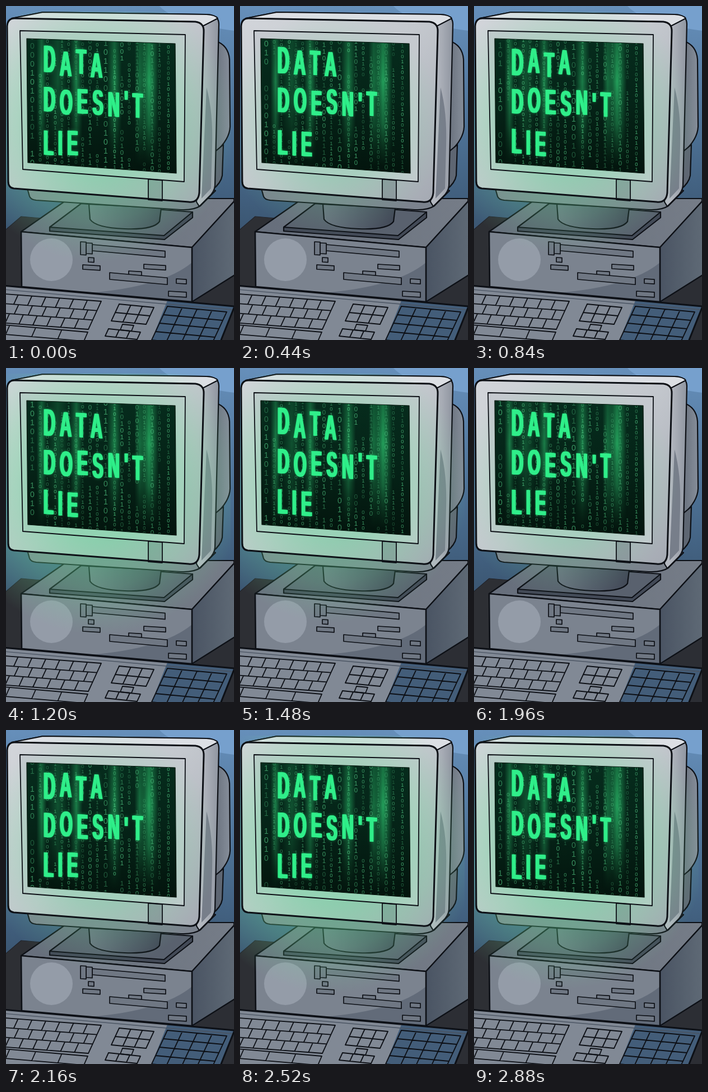
Write an HTML page with a canvas that moves like this. It is 407 px wide and 595 px high and loops after 2920 ms.

```html
<!DOCTYPE html>
<html lang="en">
<head>
<meta charset="utf-8">
<title>Data doesn't lie</title>
<style>
html, body { margin: 0; width: 100%; height: 100%; overflow: hidden; background: #496889; }
canvas { display: block; }
</style>
</head>
<body>
<canvas id="stage" width="407" height="595"></canvas>
<script>
const LOOP = 2920, STEP = 40, TAU = Math.PI * 2;
const INK = '#0d1016';
const c = document.getElementById('stage').getContext('2d');

let seed = 11;
const rnd = () => (seed = (seed * 16807) % 2147483647) / 2147483647;

function shape(d, fill, line = 2.2, ink = INK) {
  const p = new Path2D(d);
  if (fill) { c.fillStyle = fill; c.fill(p); }
  if (line) { c.strokeStyle = ink; c.lineWidth = line; c.stroke(p); }
}

function ramp(x0, y0, x1, y1, ...colors) {
  const g = c.createLinearGradient(x0, y0, x1, y1);
  colors.forEach((k, i) => g.addColorStop(i / (colors.length - 1), k));
  return g;
}

// A slanted box split into keys: origin, vector along the row, vector down.
function keys(x, y, ux, uy, vx, vy, cols, rows, shift = 0) {
  let d = '';
  for (let r = 0; r <= rows; r++) {
    const a = r / rows;
    d += `M${x + vx * a} ${y + vy * a}l${ux} ${uy}`;
    if (r === rows) break;
    for (let i = 0; i <= cols; i++) {
      const edge = i === 0 || i === cols;
      const b = (i + (edge ? 0 : shift * (r % 2))) / cols;
      d += `M${x + vx * a + ux * b} ${y + vy * a + uy * b}l${vx / rows} ${vy / rows}`;
    }
  }
  shape(d, null, 1.8);
}

const slot = (x, y, w, h, k = 0.06) =>
  shape(`M${x} ${y}l${w} ${w * k}v${h}l${-w} ${-w * k}z`, '#6f7783', 1.7);

function room() {
  c.fillStyle = ramp(0, 0, 0, 400, '#668fba', '#4f7499', '#3b5672');
  c.fillRect(0, 0, 407, 595);
  shape('M274 0Q300 30 407 44V0z', '#76a0cd', 0);
  shape('M0 398L27 375L95 381L40 595H0z', '#2d2f34', 0);
  shape('M0 398L27 375L62 378', null, 1.2, '#22242b');
  shape('M330 530L407 478V595H330z', '#2c2e34', 0);
}

function tower() {
  shape('M27 402L112 343L407 343V348L332 430z', ramp(60, 380, 400, 360, '#676f7c', '#757c87'));
  shape('M332 430L410 345V478L332 527z', ramp(332, 0, 407, 0, '#4a5463', '#5e6975'));
  shape('M27 402L332 430V527L28 500z', '#7b838f', 0);
  shape('M150 511Q280 500 332 457V527z', '#626b79', 0);
  shape('M27 402L332 430V527L28 500z', null, 2.6);

  c.fillStyle = '#949ca8';
  c.beginPath();
  c.arc(81, 452, 38, 0, TAU);
  c.fill();

  slot(154, 425, 130, 11, 0.09);
  slot(143, 422, 11, 19);
  slot(133, 420, 10, 23);
  slot(147, 448, 10, 8);
  slot(137, 461, 31, 8);
  slot(246, 460, 39, 8);
  slot(219, 472, 23, 7);
  slot(185, 475, 103, 12, 0.09);
  slot(304, 486, 18, 8);
  slot(290, 508, 32, 9);

  shape('M78 394V401L283 416L333 377V367z', '#434a57');
  shape('M78 394L134 352L333 367L282 409z', '#59616e');
  shape('M148 353L150 380Q160 395 212 397Q263 399 274 384L277 360z',
    ramp(148, 0, 277, 0, '#69717e', '#535b69', '#424a57'));
}

function keyboard() {
  const body = 'M-5 498L275 523L408 535L382 600H-5z';
  c.save();
  c.clip(new Path2D(body));
  shape(body, '#818995', 0);
  shape('M290 520L420 530V600H258L274 560z', '#435d79', 0);
  shape('M-5 505L275 530L404 541', null, 1.3, '#4a5462');
  keys(-28, 511, 198, 15, -23, 50, 8, 3, 0.35);
  keys(-40, 565, 186, 16, -7, 16, 4, 1);
  keys(202, 531, 62, 6, -14, 30, 3, 2);
  keys(208, 567, 20, 2, -4, 10, 1, 1);
  keys(183, 575, 57, 6, -6, 13, 3, 1);
  keys(288, 535, 106, 10, -28, 60, 4, 4);
  c.restore();
  shape(body, null, 3);
}

function glow(power) {
  const g = c.createRadialGradient(165, 210, 100, 165, 210, 200 + 65 * power);
  g.addColorStop(0, `rgba(85,225,145,${0.25 + 0.2 * power})`);
  g.addColorStop(0.5, `rgba(110,225,155,${0.12 + 0.16 * power})`);
  g.addColorStop(1, 'rgba(120,220,160,0)');
  c.fillStyle = g;
  c.fillRect(0, 10, 401, 474);
}

function monitor(power) {
  const front = 'M2 36Q3 22 15 22L338 28Q354 30 353 46L345 333Q343 351 326 349L14 325Q4 324 4 312z';
  const bezel = 'M25 44L320 51L318 313L30 291z';
  const button = 'M254 308.5V345L279 347V310.5z';

  shape('M374 62Q397 70 399 95L400 215Q399 238 374 260z', ramp(370, 0, 401, 0, '#666e7a', '#878f9b'));
  shape('M370 262L388 247L386 302Q384 315 368 328z', '#5e6672');
  shape('M38 325L42 339Q44 345 54 346L312 363Q335 364 347 356L374 329L350 320z', '#7b828d');
  shape('M10 22L66 11L358 15Q380 16 380 32L373 320Q372 331 362 340L345 357L340 349L352 50z',
    ramp(350, 0, 380, 0, '#b4b8c0', '#8f95a0'));
  shape('M10 22L66 11L358 15Q374 16 378 22L349 37Q346 29 338 28z', '#dcdfe4', 2);
  shape('M358 145Q370 190 368 250L366 325L349 343z', '#777e8a', 0);
  shape(front, ramp(0, 22, 340, 350, '#d2d5da', '#c4c8ce', '#a5aab3'), 0);
  shape(bezel, '#c5c9cf', 0);
  shape(button, '#8f949e', 0);
  glow(power);
  shape(front, null, 3);
  shape(bezel, null, 1.8);
  shape(button, null, 1.8);
}

const columns = [47, 61, 74, 88, 100, 112, 125, 137, 150, 163, 178, 194, 207, 220, 234, 247, 261, 274, 290]
  .map(x => {
    const big = x === 47 || x === 178;
    const pitch = big ? 16 : x % 3 ? 9.4 : 12;
    let on = true;
    const digits = Array.from({ length: Math.ceil(300 / pitch) }, () => {
      if (rnd() < (on ? 0.05 : 0.4)) on = !on;
      return on ? (rnd() < 0.5 ? '0' : '1') : '';
    });
    return { x, pitch, digits, size: big ? 14 : x % 3 ? 9.5 : 11.5,
      laps: 1 + Math.floor(rnd() * 2), start: rnd(), alpha: 0.55 + rnd() * 0.35 };
  });

function rain(u) {
  c.textAlign = 'center';
  for (const k of columns) {
    const len = k.pitch * k.digits.length;
    const top = 40 + (k.x - 37) * 0.05;
    c.font = `${k.size}px "Liberation Sans", sans-serif`;
    k.digits.forEach((digit, i) => {
      const y = (i * k.pitch + (u * k.laps + k.start) * len) % len;
      c.fillStyle = `rgba(85,205,135,${k.alpha * (0.75 + 0.25 * Math.sin(i * 0.7 + k.x))})`;
      c.fillText(digit, k.x, top + y);
    });
  }
}

// Condensed capitals; every line bobs at its own pace, letter after letter.
const lines = [
  { word: 'DATA', base: 120, cycles: 2, peak: 840, lag: Math.PI, height: 3 },
  { word: "DOESN'T", base: 189, cycles: 2, peak: 840, lag: 2.4, height: 2 },
  { word: 'LIE', base: 262, cycles: 1, peak: 100, lag: 0.5, height: 3 }
];

function slogan(t) {
  const size = 63, narrow = 0.46;
  c.font = `bold ${size}px "Liberation Sans", sans-serif`;
  c.textAlign = 'left';
  c.fillStyle = '#30ee8a';
  c.shadowColor = 'rgba(30,230,120,.65)';
  for (const { word, base, cycles, peak, lag, height } of lines) {
    let x = 67;
    [...word].forEach((ch, i) => {
      const bob = height * Math.cos(TAU * cycles * (t - peak) / LOOP - i * lag);
      c.save();
      c.translate(x, base + (x - 67) * 0.052 + bob);
      c.transform(narrow, 0.025, 0, word === 'DATA' && i === 0 ? 1.08 : 1, 0, 0);
      for (const dx of [-3, 3, 0]) {
        c.shadowBlur = dx ? 0 : 5;
        c.fillText(ch, dx, 0);
      }
      c.restore();
      x += c.measureText(ch).width * narrow + 8.2;
    });
  }
  c.shadowBlur = 0;
}

function stripe(x, w, a) {
  for (let i = -w; i < w; i++) {
    const k = a * (1 - Math.abs(i) / w);
    c.fillStyle = ramp(0, 60, 0, 285, `rgba(36,160,90,${k * 0.7})`, `rgba(40,180,102,${k})`,
      `rgba(34,150,86,${k * 0.7})`, 'rgba(20,90,50,0)');
    c.fillRect(x + i, 50, 1, 255);
  }
}

function screen(t) {
  const glass = new Path2D('M37 58L302 67L304 298L39 279z');
  c.save();
  c.clip(glass);
  c.fillStyle = ramp(0, 58, 0, 298, '#062c1d', '#052317', '#03140d');
  c.fillRect(30, 50, 280, 255);
  stripe(63, 9, 0.6);
  stripe(92, 18, 0.3);
  stripe(125, 11, 0.6);
  stripe(193, 13, 0.6);
  stripe(238, 9, 0.5);
  stripe(255, 17, 0.85);
  rain(t / LOOP);
  slogan(t);
  c.restore();
  c.strokeStyle = '#07170f';
  c.lineWidth = 1.2;
  c.stroke(glass);
}

function draw(now) {
  const t = Math.floor((now % LOOP) / STEP) * STEP;
  const power = 0.5 + 0.5 * Math.cos(TAU * (t - 1200) / (LOOP / 2));
  c.lineJoin = c.lineCap = 'round';
  room();
  tower();
  keyboard();
  monitor(power);
  screen(t);
  requestAnimationFrame(draw);
}
requestAnimationFrame(draw);
</script>
</body>
</html>
```
